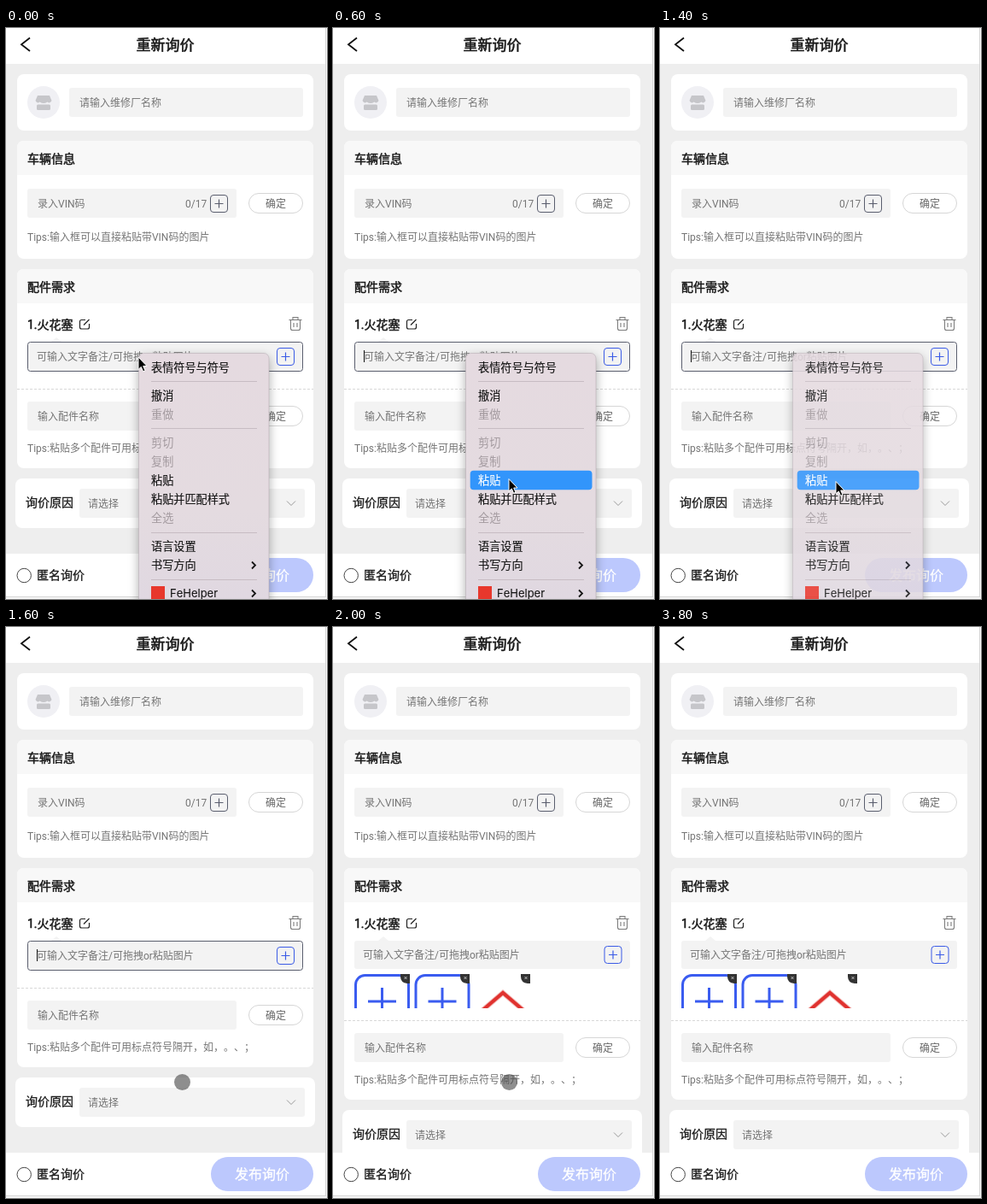
An HTML page that plays this animation: 376 px wide and 668 px high, repeating every 4000 ms.

```html
<!DOCTYPE html>
<html lang="zh-CN">
<meta charset="utf-8">
<style>
html, body { margin: 0; width: 100%; height: 100%; overflow: hidden; background: #fff }
svg {
  display: block;
  font-family: Roboto, "Noto Sans CJK SC", "Noto Sans CJK", sans-serif;
  font-kerning: none;
  text-spacing-trim: space-all;
}
#menu { filter: drop-shadow(0 4px 6px rgba(0, 0, 0, .32)) }
</style>
<body>
<script>
const BLUE = '#3b5be6', SLATE = '#5a5e6e', GREY = '#757575', FIELD = '#f3f3f3', INK = '#1a1a1a';

// Text is placed by its left edge and vertical centre; bold thickens the strokes.
const text = (s, x, cy, size = 12, fill = GREY, bold = 0, extra = '') =>
  `<text x="${x}" y="${cy + size * .38}" font-size="${size}" fill="${fill}" ` +
  `stroke="${fill}" stroke-width="${bold}" ${extra}>${s}</text>`;
const rect = (x, y, w, h, r, fill, extra = '') =>
  `<rect x="${x}" y="${y}" width="${w}" height="${h}" rx="${r}" fill="${fill}" ${extra}/>`;
const line = (d, stroke, width = 1, extra = '') =>
  `<path d="${d}" fill="none" stroke="${stroke}" stroke-width="${width}" ${extra}/>`;
const group = (id, body) => `<g id="${id}">${body}</g>`;

const plusBox = (cx, cy, color) =>
  rect(cx - 10, cy - 10, 20, 20, 3.5, 'none', `stroke="${color}"`) +
  line(`M${cx - 5} ${cy}h10M${cx} ${cy - 5}v10`, color, 1.2);
const confirmButton = y =>
  rect(284.5, y + .5, 63, 23, 11.5, '#fff', 'stroke="#d6d6d6"') + text('确定', 304, y + 12, 12, '#666');
const section = (y, h, title, id = '') =>
  rect(13, y, 347, h, 8, '#fff', id) +
  `<path d="M13 ${y + 40}v-32q0-8 8-8h331q8 0 8 8v32z" fill="#f8f8f8"/>` +
  text(title, 25, y + 21, 14, INK, .5);

const header =
  rect(0, 0, 374, 42, 0, '#fff') +
  line('M28 11.5L18 19.3L28 27', '#111', 1.8) +
  text('重新询价', 152.5, 20, 17, INK, .6);

const shop =
  rect(13, 54, 347, 66, 8, '#fff') +
  '<circle cx="44" cy="87" r="19" fill="#f0f0f4"/>' +
  '<path d="M37 79h14l2.5 6q-2 4-5 1.5q-4.5 3-9 0q-3 2.5-5-1.5z" fill="#c6c6ca"/>' +
  rect(36, 89.5, 16, 6.5, 1.5, '#c6c6ca') +
  rect(74, 70, 274, 34, 3, FIELD) +
  text('请输入维修厂名称', 86, 87);

const vehicle =
  section(132, 138, '车辆信息') +
  rect(25, 188, 245, 34, 3, FIELD) +
  text('录入VIN码', 37, 205) + text('0/17', 210, 205) +
  plusBox(249.5, 205.5, SLATE) + confirmButton(193) +
  text('Tips:输入框可以直接粘贴带VIN码的图片', 25, 244);

const parts =
  section(282, 233, '配件需求', 'id="partsCard"') +
  text('1.', 25, 347, 14, INK, .5) + text('火花塞', 36.5, 347, 14, INK, .5) +
  line('M93 341.5h-4.5q-2 0-2 2v6.5q0 2 2 2h7q2 0 2-2v-4M91 347.5l6.5-6.5', '#222', 1.2) +
  line('M331.5 341.5h15M336 341v-2.5h6v2.5M333.5 341.5v10q0 2 2 2h7q2 0 2-2v-10M337 345v5M341 345v5', '#7c7c7c', 1.1) +
  `<path d="M53 367l6-5l6 5z" fill="${FIELD}"/>`;

const note = '可输入文字备注/可拖拽or粘贴图片';
const focused =
  rect(25.5, 367.5, 322, 34, 3, FIELD, `stroke="${SLATE}"`) +
  text(note, 36, 384) + plusBox(327.5, 384.5, BLUE) +
  line('M36.5 377v14', '#111', 1, 'id="caret"');

const badge = x =>
  `<path d="M${x - 11} 406h11v11h-3q-8-1-8-8z" fill="#333"/>` +
  line(`M${x - 6.5} 409l3 3m0-3l-3 3`, '#ddd', .8);
const plusThumb = x =>
  rect(x + 1.5, 407.5, 62, 62, 11, '#fff', 'stroke="#3a5cf0" stroke-width="3"') +
  line(`M${x + 16} 438h33M${x + 32.5} 422v32`, '#3a5cf0', 3);
const pasted =
  rect(25, 367, 323, 33, 3, FIELD) +
  text(note, 35, 383) + plusBox(328, 383.5, BLUE) +
  '<g clip-path="url(#thumbClip)">' + plusThumb(25) + plusThumb(95.5) +
  line('M172 451L199 428L226 451', '#f3b9b6', 6) + line('M172 451L199 428L226 451', '#e0322f', 4) +
  [90, 160, 231].map(badge).join('') + '</g>';

const lower =
  line('M13 422.5H360', '#d8d8d8', 1, 'stroke-dasharray="3 2"') +
  rect(25, 437, 245, 34, 3, FIELD) + text('输入配件名称', 37, 454) + confirmButton(442) +
  text('Tips:粘贴多个配件可用标点符号隔开，如，。、；', 25, 491.5) +
  rect(11, 527, 351, 58, 8, '#fff') +
  text('询价原因', 23, 555, 14, INK, .3) +
  rect(86, 539, 264, 34, 3, FIELD) + text('请选择', 96, 556) +
  line('M329 553.5l5 5l5-5', '#999');

const footer =
  rect(0, 615, 374, 50, 0, '#fff') +
  '<circle cx="21.2" cy="640.5" r="8.2" fill="#fff" stroke="#444"/>' +
  text('匿名询价', 36, 640, 14, INK, .3) +
  rect(240, 620, 120, 40, 20, '#bcc8fd') +
  text('发布询价', 268, 640, 16, '#fff', .3) +
  rect(0, 665, 376, 3, 0, '#f7f7f7') + line('M0 665.5H374.5M374.5 0V666', '#d4d4d4');

const items = [['表情符号与符号', 397], ['撤消', 430], ['重做', 452, 1], ['剪切', 485, 1], ['复制', 507, 1],
  ['粘贴', 529], ['粘贴并匹配样式', 551], ['全选', 573, 1], ['语言设置', 606], ['书写方向', 628]];
const menu =
  rect(155.5, 380.5, 152.5, 310, 6, 'url(#menuFill)', 'stroke="#b9afb6" stroke-width=".6"') +
  line([413.5, 468.5, 590.5, 645.5].map(y => `M170 ${y}H294`).join(''), '#c7bcc3') +
  rect(160.7, 0, 142.8, 22.5, 4, '#3295fb', 'id="hover"') +
  items.map(([s, y, off]) =>
    text(s, 170, y, 13.15, off ? '#a39a9f' : '#151515', off ? 0 : .15, `data-row="${y}"`)).join('') +
  rect(170, 653, 16, 16, 0, '#e8372c') +
  text('FeHelper', 192, 661, 13, '#151515', .1, 'font-family="Inter, sans-serif"') +
  line('M288 624.5l4 4l-4 4M288 657.5l4 4l-4 4', '#151515', 1.8);

const arrow = '<path d="M0 0V14.5L3.3 11.4L5.6 16.8L8 15.8L5.7 10.5H10Z" fill="#000" stroke="#fff"/>';

document.body.innerHTML = `<svg width="376" height="668" viewBox="0 0 376 668">
  <defs>
    <clipPath id="thumbClip"><rect x="25" y="406" width="206" height="40"/></clipPath>
    <linearGradient id="menuFill" x2="0" y2="1">
      <stop stop-color="#e5dae0"/><stop offset=".6" stop-color="#e4dbe0"/><stop offset="1" stop-color="#dfd7e1"/>
    </linearGradient>
  </defs>` +
  rect(0, 0, 374, 668, 0, '#eeeeee') + header + shop + vehicle + parts +
  group('focused', focused) + group('pasted', pasted) + group('lower', lower) + footer +
  group('menu', menu) + group('arrow', arrow) +
  '<circle id="dot" cx="206.5" cy="532.5" r="9.5" fill="#484848" fill-opacity=".62"/></svg>';

const $ = id => document.getElementById(id);
const show = (id, on) => $(id).setAttribute('visibility', on ? 'inherit' : 'hidden');
const rows = document.querySelectorAll('[data-row]');

function draw(t) {
  const done = t >= 2000, open = t < 1600;
  show('focused', !done);
  show('pasted', done);
  show('caret', !done && (t >= 200 && t < 800 || t >= 1200 && t < 1800));
  $('lower').setAttribute('transform', `translate(0 ${done ? 38 : 0})`);
  $('partsCard').setAttribute('height', done ? 271 : 233);

  const row = t < 400 ? 0 : t < 600 ? 397 : 529;
  show('menu', open);
  $('menu').setAttribute('opacity', t < 1400 ? 1 : .87);
  show('hover', open && row);
  $('hover').setAttribute('y', row - 11.2);
  for (const r of rows) {
    const active = +r.dataset.row === row;
    r.style.fill = r.style.stroke = active ? '#fff' : '';
  }

  const [x, y] = t < 400 ? [155, 385] : t < 600 ? [190, 396] : t < 800 ? [206, 527.5] : [206, 530.5];
  show('arrow', open);
  $('arrow').setAttribute('transform', `translate(${x} ${y})`);
  show('dot', !open && t < 3000);
}

function tick() {
  draw(performance.now() % 4000);
  requestAnimationFrame(tick);
}
tick();
</script>
</body>
</html>
```
